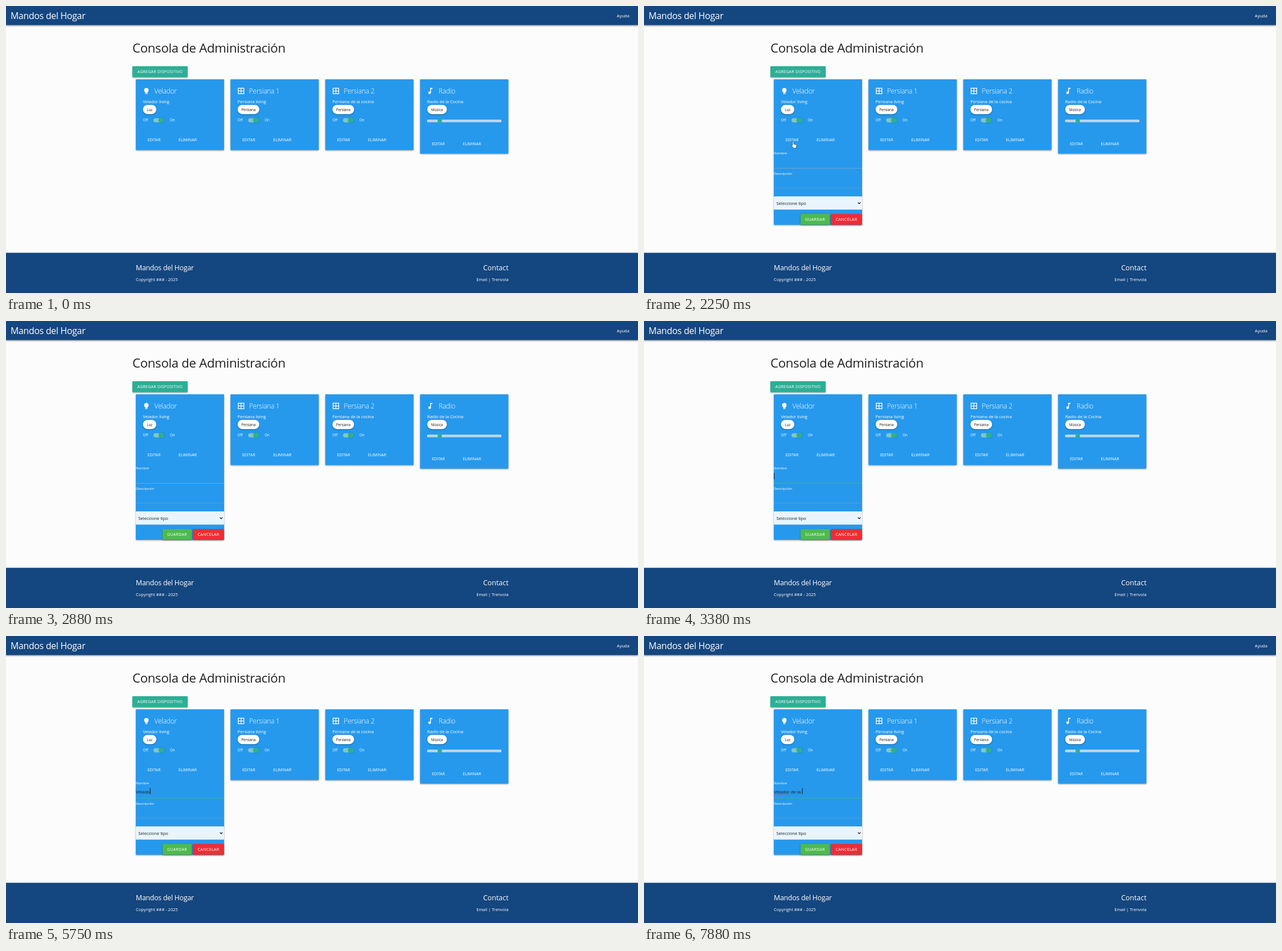
Recreate the animation shown at these times as an HTML page with a canvas. Size 1110 by 505 pixels, loop 8000 ms.

```html
<!DOCTYPE html>
<html lang="es">
<head>
<meta charset="utf-8">
<title>Consola de Administración</title>
<style>
html, body { margin: 0; width: 100%; height: 100%; overflow: hidden; background: #fcfcfc; }
canvas { display: block; width: 1110px; height: 505px; }
</style>
</head>
<body>
<canvas id="stage"></canvas>
<script>
const W = 1110, H = 505, LOOP = 8000;
const canvas = document.getElementById('stage');
const ctx = canvas.getContext('2d');
const dpr = window.devicePixelRatio || 1;
canvas.width = W * dpr;
canvas.height = H * dpr;

const NAVY = '#14467f', BLUE = '#2699ed', TEAL = '#2baf95', WHITE = '#fff';
const FONT = '"Open Sans", "Noto Sans", sans-serif';
const BRAND = 'Mandos del Hogar';
const CARD_W = 155;

const cards = [
  { x: 228, icon: bulb, title: 'Velador', note: 'Velador living', chip: 'Luz', chipW: 23.5 },
  { x: 394.3, icon: pane, title: 'Persiana 1', note: 'Persiana living', chip: 'Persiana', chipW: 38 },
  { x: 560.8, icon: pane, title: 'Persiana 2', note: 'Persiana de la cocina', chip: 'Persiana', chipW: 38 },
  { x: 727.3, icon: note, title: 'Radio', note: 'Radio de la Cocina', chip: 'Música', chipW: 34.5, slider: true }
];

// [time, typed text, caret shown]
const typing = [
  [3000, '', true], [4000, '', false], [4500, 'V', true], [4630, 'Ve', true],
  [4750, 'Vel', true], [4880, 'Vela', true], [5250, 'Vela', false],
  [5500, 'Velad', true], [5750, 'Velado', true], [5880, 'Velador', true],
  [6000, 'Velador ', true], [6250, 'Velador d', true], [6380, 'Velador de', true],
  [6500, 'Velador de ', true], [7000, 'Velador de ', false], [7130, 'Velador de l', true],
  [7630, 'Velador de l', false], [7750, 'Velador de la', true], [7880, 'Velador de la ', true]
];
const FORM_AT = 2250, SPELL_AT = 6130;

function text(s, x, y, size, { color = WHITE, gap = 0, weight = 400, align = 'left' } = {}) {
  ctx.font = `${weight} ${size}px ${FONT}`;
  ctx.letterSpacing = gap + 'px';
  ctx.textAlign = align;
  ctx.fillStyle = color;
  ctx.fillText(s, x, y);
}

function box(x, y, w, h, color, r = 0) {
  ctx.fillStyle = color;
  ctx.beginPath();
  ctx.roundRect(x, y, w, h, r);
  ctx.fill();
}

function raised(x, y, w, h, color, r = 1, alpha = 0.4) {
  ctx.save();
  ctx.shadowColor = `rgba(0,0,0,${alpha})`;
  ctx.shadowBlur = 2.5 * dpr;
  ctx.shadowOffsetY = dpr;
  box(x, y, w, h, color, r);
  ctx.restore();
}

function disc(x, y, r, color) {
  ctx.fillStyle = color;
  ctx.beginPath();
  ctx.arc(x, y, r, 0, Math.PI * 2);
  ctx.fill();
}

function strokePath(d, color, width) {
  ctx.strokeStyle = color;
  ctx.lineWidth = width;
  ctx.stroke(new Path2D(d));
}

function bulb(x, y) {
  disc(x + 6, y + 4.1, 3.9, WHITE);
  box(x + 4, y + 6, 4, 3.2, WHITE);
  box(x + 4, y + 9.8, 4, 1.2, WHITE, 0.5);
}

function pane(x, y) {
  ctx.strokeStyle = WHITE;
  ctx.lineWidth = 1.3;
  ctx.strokeRect(x + 1.2, y + 0.6, 9.8, 9.8);
  box(x + 5.5, y + 0.6, 1.2, 9.8, WHITE);
  box(x + 1.2, y + 4.9, 9.8, 1.2, WHITE);
}

function note(x, y) {
  disc(x + 4.2, y + 8.6, 2.3, WHITE);
  box(x + 5.2, y, 1.3, 8.6, WHITE);
  box(x + 5.2, y, 3.8, 2.2, WHITE);
}

function toggle(x) {
  text('Off', x, 203, 6.2);
  box(x + 18.5, 197.4, 19, 7.4, '#82c8c3', 3.7);
  ctx.save();
  ctx.shadowColor = 'rgba(0,0,0,.3)';
  ctx.shadowBlur = 2 * dpr;
  disc(x + 32.7, 201, 5.1, TEAL);
  ctx.restore();
  text('On', x + 47.5, 203, 6.2);
}

function slider(x) {
  box(x, 200.3, 130, 4, '#edf5fc', 1);
  box(x + 1, 201.7, 128, 1.2, '#8eafca');
  disc(x + 22, 202.3, 3.9, TEAL);
}

function card(c, open) {
  const x = c.x + 12.5;
  raised(c.x, 129, CARD_W, open ? 256 : c.slider ? 130.7 : 124.5, BLUE);
  c.icon(x, 144);
  text(c.title, x + 20, 154.2, 12, { gap: -0.25, weight: 300 });
  text(c.note, x, 171.2, 7.6, { gap: -0.08 });
  raised(x, 174, c.chipW, 16.2, WHITE, 8.1, 0.35);
  text(c.chip, x + c.chipW / 2, 184.6, 6.4, { color: '#222', weight: 500, gap: -0.05, align: 'center' });
  (c.slider ? slider : toggle)(x);
  const y = c.slider ? 244.6 : 238.4;
  text('EDITAR', x + 8.2, y, 6.9);
  text('ELIMINAR', x + 62.5, y, 7.05);
}

function wave(x, y, length) {
  let d = `M${x} ${y}`;
  for (let i = 1; i * 1.5 <= length; i++) d += `L${x + i * 1.5} ${y + (i % 2)}`;
  strokePath(d, '#c5405a', 0.6);
}

function form(t) {
  const x = 228;
  const step = typing.filter(s => s[0] <= t).pop();
  const label = { gap: -0.1 };
  const focus = Math.min(1, Math.max(0, (t - 3000) / 300));

  text('Nombre', x, 261, 6.1, label);
  box(x, 285, CARD_W, 0.7, '#8aa5ba');
  if (focus) {
    ctx.globalAlpha = focus;
    box(x, 284.6, CARD_W, 1.1, '#2aae9e');
    ctx.globalAlpha = 1;
  }
  text('Descripción', x, 297, 6.1, label);
  box(x, 320.3, CARD_W, 0.6, '#5e9fce');

  if (step) {
    const [, typed, caret] = step;
    text(typed, x, 276.6, 7.8, { color: '#14202c' });
    const end = x + ctx.measureText(typed).width;
    if (t >= SPELL_AT) wave(x, 278, ctx.measureText('Velador').width);
    if (caret) box(end + 0.2, 267.5, 0.9, 11, '#111');
  }

  box(x, 335, CARD_W, 23.2, '#e9f4fd', 1);
  text('Seleccione tipo', x + 4.5, 349.6, 7.6, { color: '#1c1c1c', gap: -0.05 });
  strokePath('M375.7 345.6l2.3 2.3 2.3-2.3', '#111', 1.3);

  raised(275, 366, 51.5, 18.8, '#4dba50');
  text('GUARDAR', 283, 378.2, 7.2, { gap: 0.2 });
  raised(328.3, 366, 54.4, 18.8, '#ee2d36');
  text('CANCELAR', 336.5, 378.2, 7.3, { gap: 0.2 });
}

function hand(t) {
  if (t < 2000 || t >= 2750) return;
  const away = Math.max(0, (2250 - t) / 250);
  ctx.save();
  ctx.translate(260 + 8 * away, 238 + 4 * away);
  const shape = new Path2D('M1 1Q2 -.4 3 1V5L7 6Q8 6.4 7.8 8L7 12H2.5L-.5 8Q-.8 6.6 1 7Z');
  ctx.fillStyle = WHITE;
  ctx.fill(shape);
  ctx.strokeStyle = '#26394b';
  ctx.lineWidth = 0.6;
  ctx.stroke(shape);
  ctx.restore();
}

function draw(t) {
  ctx.setTransform(dpr, 0, 0, dpr, 0, 0);
  box(0, 0, W, H, '#fcfcfc');

  raised(0, 0, W, 33.5, NAVY, 0);
  text(BRAND, 8, 23.3, 15.9, { gap: -0.3 });
  text('Ayuda', 1095, 19.6, 7.6, { align: 'right' });

  text('Consola de Administración', 222, 82, 22.2, { color: '#212121', gap: -0.3 });
  raised(222, 106, 97, 19.2, TEAL);
  text('AGREGAR DISPOSITIVO', 230.6, 118.2, 7.15, { gap: 0.17 });

  const open = t >= FORM_AT;
  cards.forEach((c, i) => card(c, open && i === 0));
  if (open) form(t);

  box(0, 434.3, W, H - 434.3, NAVY);
  text(BRAND, 228, 465.3, 12.3, { gap: -0.22 });
  text('Copyright ### - 2025', 228, 484, 7.5);
  text('Contact', 882.5, 465.3, 12.5, { align: 'right', gap: -0.05 });
  text('Email | Trenvola', 882.5, 484, 7.5, { align: 'right', gap: -0.05 });

  hand(t);
}

const start = performance.now();
function frame() {
  draw((performance.now() - start) % LOOP);
  requestAnimationFrame(frame);
}
frame();
</script>
</body>
</html>
```
